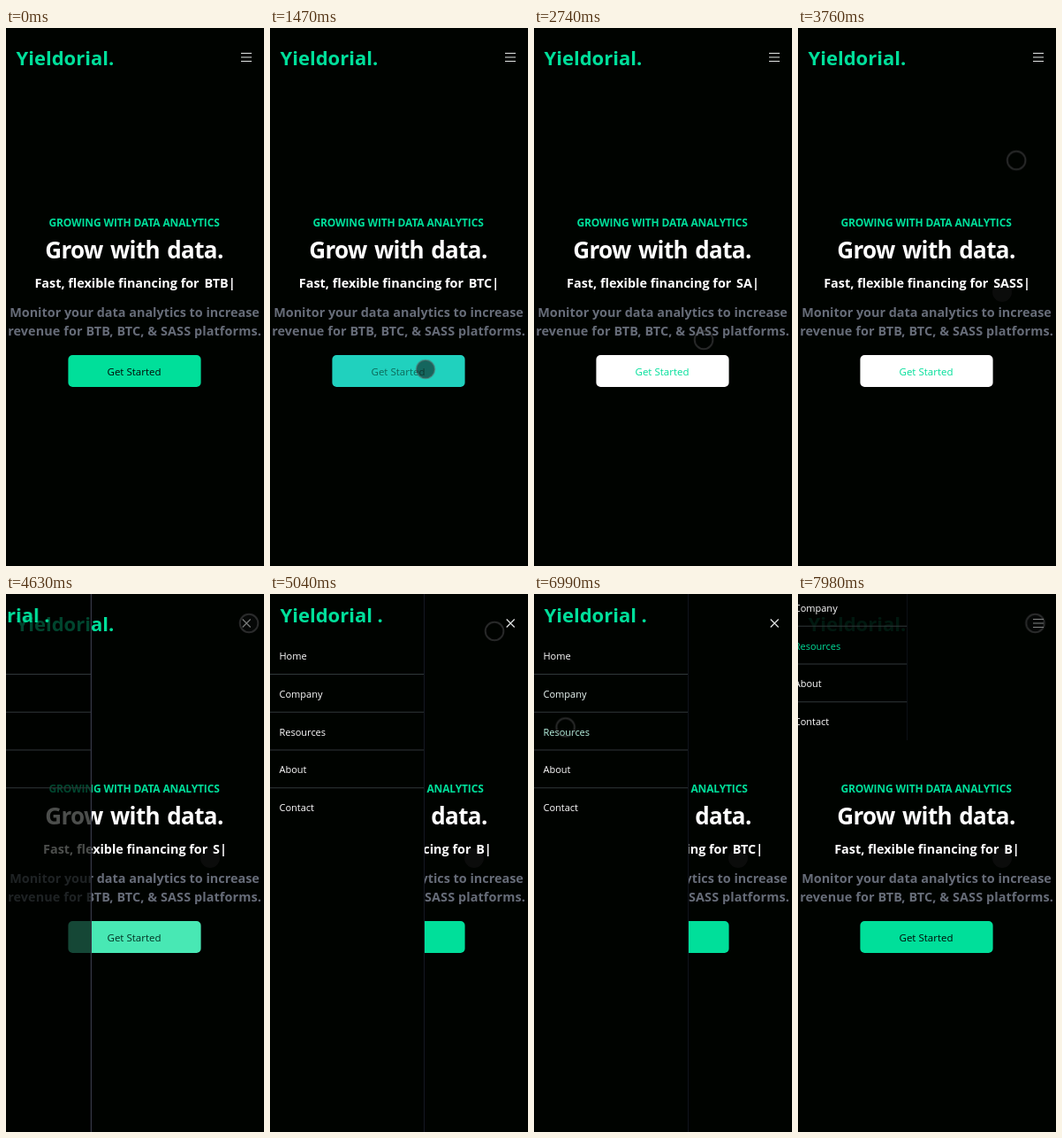
These frames come from a looping animation (292x607 px, 8 s). An HTML page:

```html
<!DOCTYPE html>
<html lang="en">
<head>
<meta charset="utf-8">
<title>Landing page</title>
<style>
  html, body { margin: 0; width: 100%; height: 100%; overflow: hidden; background: #000300; }
  svg { display: block; width: 292px; height: 607px; }
  text { font-family: "Open Sans", "Noto Sans", sans-serif; white-space: pre; }
  .bold { font-weight: 700; }
  .mid { text-anchor: middle; }
  .brand { font-size: 22px; fill: #00df9a; }
  .tag { font-size: 12px; letter-spacing: -.14px; fill: #00df9a; }
  .title { font-size: 26px; letter-spacing: -.6px; word-spacing: 2px; fill: #fff; }
  .typed { font-size: 14.4px; fill: #fff; }
  .note { font-size: 14.4px; fill: #666c78; }
  .label { font-size: 11.5px; }
  .item { font-size: 11px; fill: #fff; }
  .rule { height: 1px; fill: #30373a; }
  .icon { fill: none; stroke: #e4e7e6; stroke-width: 1.2; }
  #ring { fill: #0c0e0e; stroke: rgba(90, 92, 94, .45); stroke-width: 2; }
</style>
</head>
<body>
<svg viewBox="0 0 292 607">
  <circle id="spot" cx="231" cy="298" r="11" fill="#0b0c0b"/>
  <text class="bold brand" x="11.5" y="42">Yieldorial.</text>
  <text class="bold tag mid" x="145" y="224">GROWING WITH DATA ANALYTICS</text>
  <text class="bold title mid" x="145" y="260">Grow with data.</text>
  <text class="bold typed mid" x="146" y="293">Fast, flexible financing for <tspan id="word" dx="2">BTB</tspan>|</text>
  <text class="bold note mid" x="145.5" y="326">Monitor your data analytics to increase</text>
  <text class="bold note mid" x="145.5" y="347" letter-spacing=".1">revenue for BTB, BTC, &amp; SASS platforms.</text>
  <rect id="button" x="70.4" y="369" width="150.2" height="36" rx="5"/>
  <text id="label" class="label mid" x="145" y="392">Get Started</text>

  <g id="menu">
    <rect id="panel" height="607" fill="#000300"/>
    <rect id="edge" width="1" height="607"/>
    <text class="bold brand" x="11.5" y="32">Yieldorial .</text>
  </g>

  <path id="bars" class="icon" d="M266 28.5h12M266 33h12M266 37.5h12"/>
  <path id="cross" class="icon" d="M267.7 28.5l9 9M276.7 28.5l-9 9"/>
  <circle id="ring" r="10.3"/>
</svg>
<script>
const LOOP = 8000;
const OPEN = 4397;
const CLOSE = 7908;
const GREEN = '#00df9a';
const $ = id => document.getElementById(id);
const at = (x, y) => `translate(${x}px, ${y}px)`;

// Steps are [time, value, easing to the next step].
function track(el, prop, steps) {
  const all = [[0, ...steps[0].slice(1)], ...steps, [LOOP, steps.at(-1)[1]]];
  return el.animate(
    all.map(([time, value, easing = 'linear']) => ({ offset: time / LOOP, [prop]: value, easing })),
    { duration: LOOP, iterations: Infinity });
}

// Hard changes only.
const hold = (el, prop, steps) =>
  track(el, prop, steps.map(([time, value]) => [time, value, 'step-end']));

function add(parent, tag, attrs, content = '') {
  const el = document.createElementNS('http://www.w3.org/2000/svg', tag);
  for (const name in attrs) el.setAttribute(name, attrs[name]);
  el.textContent = content;
  parent.append(el);
  return el;
}

const rules = [];
const items = ['Home', 'Company', 'Resources', 'About', 'Contact'].map((name, i) => {
  const y = 42.75 * i;
  if (i < 4) rules.push(add($('menu'), 'rect', { class: 'rule', y: 90 + y }));
  return add($('menu'), 'text', { class: 'item', x: 10.5, y: 74 + y }, name);
});

// The menu slides in from the left; on closing it shrinks to its content,
// jumps up and slides out.
track($('menu'), 'transform', [
  [OPEN, at(-292, 0), 'cubic-bezier(.4, 0, .2, 1)'], [OPEN + 500, at(0, 0)],
  [CLOSE, at(0, 0)], [CLOSE, at(0, -97), 'ease-in'], [7980, at(-14, -97)], [LOOP, at(-30, -97)]]);
for (const el of [$('panel'), ...rules])
  hold(el, 'width', [[0, '174px'], [CLOSE, '138px']]);
for (const el of [$('panel'), $('edge')])
  hold(el, 'height', [[0, '607px'], [CLOSE, '262px']]);
hold($('edge'), 'x', [[0, '174px'], [CLOSE, '138px']]);
track($('panel'), 'fillOpacity', [[4390, .6], [4630, .7], [4900, 1], [CLOSE, 1], [7980, .9]]);
track($('edge'), 'fill', [[4630, '#343745'], [5100, '#10141d']]);

hold($('bars'), 'opacity', [[0, 1], [4360, 0], [CLOSE, 1]]);
hold($('cross'), 'opacity', [[0, 0], [4360, 1], [CLOSE, 0]]);
hold($('spot'), 'opacity', [[0, 0], [3270, 1]]);

track($('button'), 'fill', [
  [1330, GREEN], [1470, '#1fd1be'], [1850, '#fff'], [4360, '#fff'], [4630, '#48e8b4'], [4860, GREEN]]);
track($('label'), 'fill', [
  [1330, '#000a06'], [1470, '#0c6a5a'], [1850, GREEN], [4360, GREEN], [4630, '#003122'], [4860, '#000a06']]);

track(items[0], 'fill', [[5830, '#fff'], [5910, '#93b8a6'], [6050, GREEN], [6250, GREEN], [6420, '#fff']]);
track(items[1], 'fill', [[6420, '#fff'], [6560, GREEN], [6850, GREEN], [7000, '#fff']]);
track(items[2], 'fill', [[6950, '#fff'], [7100, GREEN]]);

track($('ring'), 'transform', [
  [0, at(310, 345)], [720, at(310, 345), 'ease-in-out'], [1300, at(176, 385)],
  [2450, at(176, 385), 'ease-in'], [2740, at(192, 352)], [3250, at(231, 298)],
  [3760, at(247, 150), 'ease-out'], [4060, at(275, 33)],
  [4750, at(275, 33), 'ease-in'], [5180, at(235, 50)], [5700, at(30, 72), 'ease-out'],
  [5910, at(20, 75)], [6050, at(23, 80)], [6250, at(33, 116)], [6500, at(34, 120)],
  [6800, at(34, 122), 'ease-in-out'], [7080, at(36, 158)],
  [7240, at(36, 158), 'ease-in-out'], [7680, at(268.5, 33)]]);
track($('ring'), 'fillOpacity', [
  [1280, 0], [1400, .55], [1600, .55], [1750, 0],
  [4150, 0], [4220, .5], [4700, .5], [4800, 0],
  [5830, 0], [5900, .4], [6000, .4], [6080, 0],
  [6480, 0], [6560, .4], [6680, 0], [7060, 0], [7120, .4], [7220, 0],
  [7700, 0], [7850, .45]]);

const typing = [
  [0, 'BTB'], [530, 'BT'], [730, 'BTC'], [1795, 'BT'], [1980, 'B'], [2150, ''],
  [2340, 'S'], [2540, 'SA'], [2750, 'SAS'], [2960, 'SASS'],
  [4170, 'SAS'], [4360, 'SA'], [4520, 'S'], [4690, ''],
  [4880, 'B'], [5070, 'BT'], [5250, 'BTB'], [6390, 'BT'], [6590, 'BTC'], [7660, 'BT'], [7850, 'B']];

const clock = track(document.body, 'opacity', [[0, 1]]);
const word = $('word');

function tick() {
  const now = (clock.currentTime || 0) % LOOP;
  const text = typing.findLast(([time]) => time <= now)[1];
  if (word.textContent !== text) word.textContent = text;
  requestAnimationFrame(tick);
}
tick();
</script>
</body>
</html>
```
